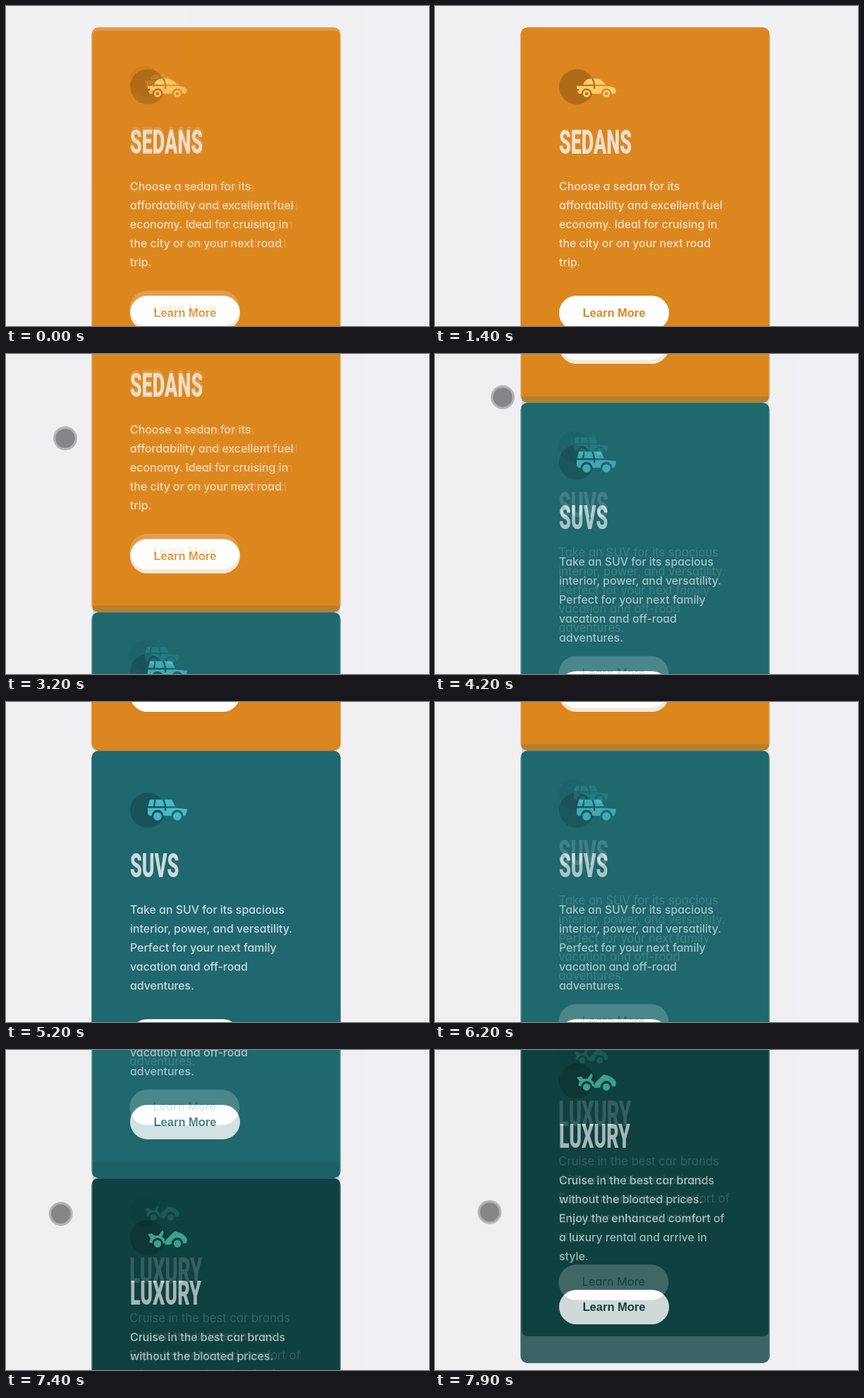
Write an HTML page that moves like this. It is 600 by 455 pixels and loops after 8 s.

```html
<!DOCTYPE html>
<html lang="en">
<head>
<meta charset="utf-8">
<title>Car cards with layout overlay</title>
<style>
  html, body { margin: 0; width: 100%; height: 100%; overflow: hidden; background: #f1f0f3; }
  svg { display: block; width: 100%; height: 100%; }
  text { white-space: pre; }

  .title { font-family: Roboto, sans-serif; font-weight: 900; fill: #f2f2f2; fill-opacity: .83; }
  .copy { font-family: Inter, sans-serif; font-weight: 500; font-feature-settings: "cv11"; fill: #fff; fill-opacity: .76; }
  .label { font: bold 16.5px "Liberation Sans", Arial, sans-serif; text-anchor: middle; }
  #overlay .copy { font-weight: 400; }
  #overlay .label { font: 16.4px Inter, sans-serif; font-feature-settings: "cv11"; }

  #page { animation: scroll 8s linear infinite; }
  #overlay { opacity: .2; animation: toggle 8s step-end infinite; }
  #pointer { animation: move 8s ease-in-out infinite, show 8s step-end infinite; }

  @keyframes scroll {
    0%, 36% { transform: translateY(0); }
    39%, 44% { transform: translateY(-149px); }
    47%, 48% { transform: translateY(-298px); }
    51%, 81% { transform: translateY(-447px); }
    84%, 85% { transform: translateY(-596px); }
    87.5% { transform: translateY(-694.5px); }
    89%, 91% { transform: translateY(-745px); }
    94%, 95% { transform: translateY(-894px); }
    98%, 100% { transform: translateY(-1043px); }
  }
  @keyframes toggle {
    0% { opacity: .2; }
    6.25% { opacity: 0; }
    19.4% { opacity: .2; }
    62.5% { opacity: 0; }
    73.75% { opacity: .2; }
  }
  @keyframes show {
    0% { visibility: hidden; }
    23.75% { visibility: visible; }
    55% { visibility: hidden; }
    80.6%, 100% { visibility: visible; }
  }
  @keyframes move {
    0%, 23.75% { transform: translate(388px, 431px); }
    30% { transform: translate(79px, 48px); }
    33.75%, 48.75% { transform: translate(84px, 120px); }
    51.8%, 80% { transform: translate(96px, 61.5px); }
    83.75%, 91% { transform: translate(78px, 235.5px); }
    94%, 100% { transform: translate(77.5px, 230.5px); }
  }
</style>
</head>
<body>
<svg viewBox="0 0 600 455">
  <rect width="600" height="455" fill="#f1f0f3"/>
  <g id="page">
    <g id="build"></g>
    <g id="overlay"></g>
  </g>
  <g id="pointer">
    <circle r="15.3" fill="none" stroke="#000" stroke-opacity=".25" stroke-width="3.2"/>
    <circle r="13.8" fill="#1c1c1c" fill-opacity=".5"/>
  </g>
</svg>
<script>
const wheels = (y, r, width) => [39, 67].map(x =>
  `<circle cx="${x}" cy="${y}" r="${r}" fill="none" stroke="currentColor" stroke-width="${width}"/>`).join('');

const cars = [
  {
    title: 'SEDANS', color: '#dc861f', tint: '#ffcc6a', pillar: '#b36f1b',
    lines: ['Choose a sedan for its', 'affordability and excellent fuel',
      'economy. Ideal for cruising in', 'the city or on your next road', 'trip.'],
    shape: `<path d="M34 22Q37 13.5 45 13.5H54Q62 15 66 22Z
      M25 24H68Q81 25 81 31L79 35H74.5A7.5 7.5 0 0 0 59.5 35H46.5A7.5 7.5 0 0 0 31.5 35H28L25.5 31H28V28H25Z"/>`
      + wheels(34.8, 3.7, 3),
    post: 'M47 13Q50.5 18 50 28'
  },
  {
    title: 'SUVS', color: '#1f686f', tint: '#48b9c6', pillar: '#1c565c',
    lines: ['Take an SUV for its spacious', 'interior, power, and versatility.',
      'Perfect for your next family', 'vacation and off-road', 'adventures.'],
    shape: `<path d="M28 10H59L64 19.5H25.5Z
      M25 22H66L81 23.5L80 29L78 33H75.5A8.5 8.5 0 0 0 58.5 33H47.5A8.5 8.5 0 0 0 30.5 33H27L25 30Z"/>`
      + wheels(33.8, 3, 5.6),
    post: 'M35.5 10L34 20M47 10Q50.5 16 50 26'
  },
  {
    title: 'LUXURY', color: '#104140', tint: '#47b9a3', pillar: '#0e3534',
    lines: ['Cruise in the best car brands', 'without the bloated prices.',
      'Enjoy the enhanced comfort of', 'a luxury rental and arrive in', 'style.'],
    shape: `<path d="M41 21L46 14L49 15.5L45 24H41Z
      M25 20L31 19L34 22H44L49 27V33H46.5A7.5 7.5 0 0 0 31.5 33L27 32L29 26Z
      M52 27L63 16Q76 18 81 27L80 33H75A8 8 0 0 0 59 33L57 35H50L49 31Z"/>`
      + wheels(33.8, 2.7, 5),
    post: 'M47 14Q51 19 50 26'
  }
];

// Two layouts of the same cards: the built page and the design laid over it.
const built = {
  x: 121.3, width: 353.4, top: 30.3, height: 486, radius: 10, left: 176,
  icon: 59.5, iconScale: 1, title: 180, titleSize: 48,
  copy: 232, copySize: 15.9, leading: 27.05,
  button: 381.7, buttonHeight: 49, label: 411.5
};
const design = {
  x: 123, width: 350.5, top: 35, height: 471.7, radius: 0, left: 175.3,
  icon: 50, iconScale: .87, title: 172.5, titleSize: 49,
  copy: 228.5, copySize: 16.6, leading: 26.7,
  button: 369.7, buttonHeight: 50.5, label: 399.7
};
const condense = .56;

function card(car, i, l) {
  const copy = car.lines.map((line, n) =>
    `<text class="copy" x="${l.left}" y="${l.copy + n * l.leading}" font-size="${l.copySize}">${line}</text>`).join('');
  return `<g transform="translate(0 ${l.top + i * l.height})">
    <rect x="${l.x}" width="${l.width}" height="${l.height}" rx="${l.radius}" fill="${car.color}"/>
    <g transform="translate(${l.left} ${l.icon}) scale(${l.iconScale})" color="${car.tint}" fill="${car.tint}">
      <circle cx="25" cy="25" r="25" fill="#000" fill-opacity=".2"/>
      ${car.shape}
      <path d="${car.post}" fill="none" stroke="${car.pillar}" stroke-width="2.3"/>
    </g>
    <text class="title" transform="translate(${l.left} ${l.title}) scale(${condense} 1)" font-size="${l.titleSize}">${car.title}</text>
    ${copy}
    <rect x="${l.left}" y="${l.button}" width="156" height="${l.buttonHeight}" rx="${l.buttonHeight / 2}" fill="#fff"/>
    <text class="label" x="${l.left + 78}" y="${l.label}" fill="${car.color}">Learn More</text>
  </g>`;
}

const stack = l => cars.map((car, i) => card(car, i, l)).join('');

document.getElementById('build').innerHTML = stack(built);
document.getElementById('overlay').innerHTML = `
  <clipPath id="round"><rect x="${design.x}" y="${design.top}" width="${design.width}" height="${design.height * 3}" rx="8"/></clipPath>
  <rect width="600" height="1600" fill="#f1f0f3"/>
  <g clip-path="url(#round)">${stack(design)}</g>`;
</script>
</body>
</html>
```
